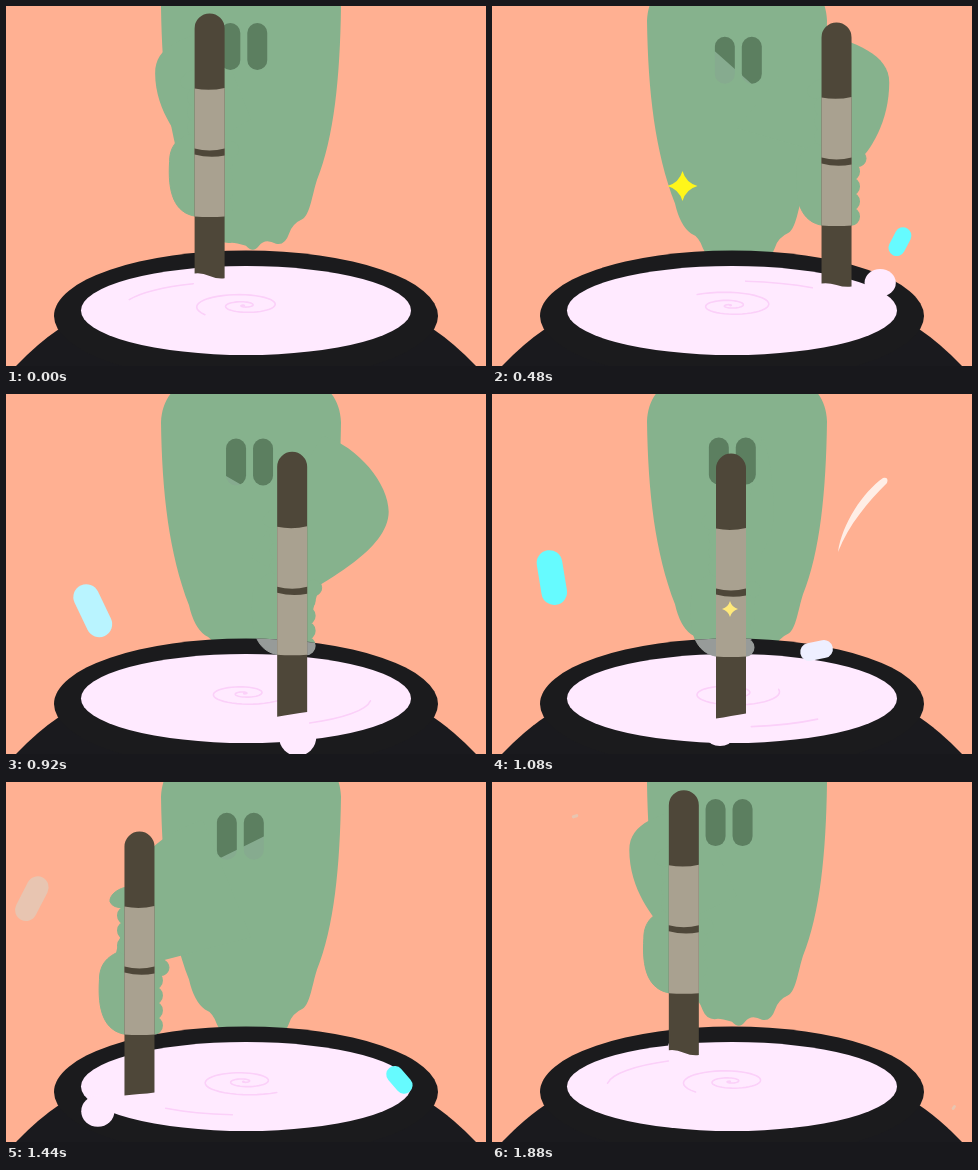
Recreate the animation shown at these times as an HTML page. Size 480 px wide and 360 px high, loop 1920 ms.

```html
<!DOCTYPE html>
<html lang="en">
<head>
<meta charset="utf-8">
<title>Stirring the cauldron</title>
<style>
  html, body { margin: 0; width: 100%; height: 100%; overflow: hidden; background: #ffb092; }
  svg { display: block; width: 100vw; height: 100vh; }
</style>
</head>
<body>
<svg viewBox="0 0 480 360">
  <defs>
    <path id="track" d="M239 6.5 A135 26.5 0 0 1 239 59.5 A135 26.5 0 0 1 239 6.5"/>
    <clipPath id="rimClip"><ellipse cx="240" cy="310" rx="192" ry="65.5"/></clipPath>
    <clipPath id="eyeClip"><path id="eyeCut"/></clipPath>
    <g id="eyes">
      <rect x="-23.5" y="-23.5" width="20" height="47" rx="10"/>
      <rect x="3.5" y="-23.5" width="20" height="47" rx="10"/>
    </g>
    <g id="hand">
      <path d="M0 118 H-15 C-26 122 -40 128 -40 148 C-42 178 -36 200 -13 203 H10 V118 Z"/>
      <path d="M-10 56 H-15 C-23 58 -30 64 -29.5 70 Q-27 77 -15 76 L0 77 Z"/>
      <circle cx="21.5" cy="136" r="8"/>
      <g fill="none" stroke-linecap="round" stroke-width="19" stroke-dasharray="0 15">
        <path d="M-13 84 V120"/><path d="M14 149 V196"/>
      </g>
    </g>
  </defs>

  <rect width="480" height="360" fill="#ffb092"/>
  <g fill="#86b28d" stroke="none">
    <path id="body" d="M155 14 C156 -10 170 -28 195 -28 H295 C320 -28 334 -10 335 14
      C334 85 328 145 311 187 C306 203 304 221 297 226 Q286 231 283 241 Q279 253 270 251
      Q259 245 253 253 Q247 261 240 253 Q230 250 226 250 Q215 252 211 242
      Q207 230 199 227 Q188 219 183 197 C163 145 156 85 155 14 Z"/>
    <path id="arm"/>
    <use href="#hand" class="held" stroke="#86b28d"/>
  </g>
  <g id="face">
    <use href="#eyes" fill="#86ab8f"/>
    <use href="#eyes" fill="#5c7f60" clip-path="url(#eyeClip)"/>
  </g>

  <path d="M10 360 Q32 337 53 323 H427 Q448 337 470 360 Z" fill="#1a1a1e"/>
  <ellipse cx="240" cy="310" rx="192" ry="65.5" fill="#1b1b1d"/>
  <g fill="#ffeaff">
    <ellipse cx="240" cy="304.5" rx="165" ry="44.5"/>
    <ellipse id="foam"/>
  </g>
  <g fill="none" stroke="#fbd0f9" stroke-width="1.6" stroke-linecap="round">
    <path id="spiral"/>
    <path id="streak" pathLength="1920" stroke-dasharray="240 1680"
      d="M240 275 A125 29 0 0 1 240 333 A125 29 0 0 1 240 275"/>
  </g>
  <g clip-path="url(#rimClip)"><use href="#hand" class="held" fill="#979b99" stroke="#979b99"/></g>

  <g class="held">
    <path id="wood" fill="#4e4739"/>
    <path d="M-15 75 Q0 78 15 74.5 V203 Q0 204 -15 203 Z" fill="#a9a190"/>
    <path d="M-15 135 Q0 139 15 135 V142 Q0 145 -15 141 Z" fill="#4e4739"/>
  </g>
  <path id="swoosh" fill="#ffeee6" d="M391 84 C371 98 350 130 346 158 C357 130 376 108 395 89 Q397 83 391 84 Z"/>
  <g id="drops"></g>
  <g id="stars"></g>
</svg>

<script>
const LOOP = 1920, STEP = 40, TAU = Math.PI * 2;
const $ = id => document.getElementById(id);
const set = (el, attrs) => { for (const k in attrs) el.setAttribute(k, attrs[k]); };
const add = (parent, tag, attrs = {}) => {
  const el = document.createElementNS("http://www.w3.org/2000/svg", tag);
  set(el, attrs);
  return parent.appendChild(el);
};
const clamp = (v, low, high) => Math.min(high, Math.max(low, v));
const mix = (a, b, u) => a + (b - a) * u;

// Each drop flies along a cubic curve while it spins
const drops = [
  { from: 240, to: 880, path: [[383, 290], [410, 240], [420, 190], [446, 176]],
    width: 17, length: 31, angle: 5, spin: 60, red: 130 },
  { from: 640, to: 1920, path: [[137, 284], [65, 170], [-50, 115], [96, 26]],
    width: 26, length: 56, angle: -54, spin: 130, red: 248 },
  { from: 1000, to: 1920, path: [[306, 258], [380, 240], [420, 370], [468, 320]],
    width: 18, length: 33, angle: 65, spin: 155, red: 248 }
];
const sparkles = [
  { x: 378, y: 247, r: 17.5, at: 280, fill: "#ffe4d4" },
  { x: 190.5, y: 180, r: 15, at: 480, fill: "#fff61a" },
  { x: 238, y: 215, r: 8, at: 1080, fill: "#ffe97a" }
];
for (const drop of drops) drop.el = add($("drops"), "rect");
for (const s of sparkles) s.el = add($("stars"), "path", {
  fill: s.fill, d: "M0 -1 Q.22 -.22 1 0 Q.22 .22 0 1 Q-.22 .22 -1 0 Q-.22 -.22 0 -1Z"
});

// Repeated interpolation reduces the control points to one point
function bezier(points, u) {
  while (points.length > 1)
    points = points.slice(1).map((p, i) => [mix(points[i][0], p[0], u), mix(points[i][1], p[1], u)]);
  return points[0];
}

function drawDrop({ el, from, to, path, width, length, angle, spin, red }, t) {
  const u = (t - from) / (to - from);
  set(el, { visibility: u >= 0 && u < 1 ? "visible" : "hidden" });
  if (u < 0 || u >= 1) return;
  const [x, y] = bezier(path, u);
  const size = 1 - u ** 4, w = width * size, h = length * size;
  const opacity = clamp(1 - (u - .5) * 6, .28, 1);
  const tint = Math.min(1, (u * 3) ** 2);
  const r = mix(red, 102, tint) + 100 * (1 - opacity);
  set(el, {
    x: -w / 2, y: -h / 2, width: w, height: h, rx: w / 2, opacity,
    fill: `rgb(${r},${mix(238, 251, tint)},255)`,
    transform: `translate(${x} ${y}) rotate(${angle + spin * u})`
  });
}

function spiralPath(turn) {
  const points = [];
  for (let i = 0; i <= 120; i++) {
    const u = i / 120, r = 51 * (1 - u) ** 2, a = turn + u * 2.75 * TAU;
    points.push(`${238 + r * Math.cos(a)} ${299.5 + r * .28 * Math.sin(a)}`);
  }
  return "M" + points.join("L");
}

// Shoulder to elbow to wrist; reach runs from -1 (left) to 1 (right)
function armPath(stick, reach) {
  const shoulder = { x: 260 + 65 * reach, y: 18 + stick.y * .4 };
  const elbow = { x: 260 + 141 * reach, y: stick.y + 60 };
  const wrist = { x: stick.x + 20 * reach, y: stick.y + 140 };
  return `M${shoulder.x} ${shoulder.y}
    C${mix(shoulder.x, elbow.x, .55)} ${shoulder.y + 12} ${elbow.x} ${elbow.y - 28} ${elbow.x} ${elbow.y}
    C${elbow.x} ${elbow.y + 38} ${wrist.x + 15 * reach} ${wrist.y - 10} ${wrist.x} ${wrist.y}
    L245 ${stick.y + 106} Z`;
}

const track = $("track"), trackLength = track.getTotalLength();
const held = document.querySelectorAll(".held");

function draw(t) {
  const phase = t / LOOP * TAU;
  const along = (t - 120 + LOOP) % LOOP / LOOP;
  const stick = track.getPointAtLength(along * trackLength);
  const depth = (stick.y - 33) / 26.5, side = (stick.x - 239) / 135;
  for (const el of held) set(el, { transform: `translate(${stick.x} ${stick.y})` });
  const end = 262.5 + 2.5 * depth, tip = end - 5 * depth;
  set($("wood"), { d: `M-15 15 A15 15 0 0 1 15 15 V${tip} Q8 ${tip + 1} 0 ${(end + tip) / 2} T-15 ${end} Z` });

  const bob = -13.8 * Math.cos(phase), sway = Math.sin(phase - TAU / 16);
  set($("body"), { transform: `translate(0 ${bob + .5})` });
  set($("face"), { transform: `translate(${240.3 + 6.5 * sway} ${54.3 + bob})` });
  set($("arm"), { d: armPath(stick, Math.tanh(2.4 * Math.sin(phase - TAU * 140 / LOOP))) });

  // The arm's upper edge tilts across the eyes
  const cut = 34 - 26 * sway ** 2, tilt = 24 * (.75 * sway + .2);
  set($("eyeCut"), { d: `M-24 -30 H24 V${cut + tilt} L-24 ${cut - tilt} Z` });

  const heave = Math.abs(side) * (1 + depth) * (1 + .7 * side);
  set($("foam"), {
    cx: 240 + 180 * side - 12 * depth, cy: 303 + 42 * depth,
    rx: 12 + 8 * heave, ry: 7 + 15 * heave
  });
  set($("spiral"), { d: spiralPath(TAU * 140 / 360 + phase) });
  set($("streak"), { "stroke-dashoffset": 430 - t });

  for (const drop of drops) drawDrop(drop, t);
  for (const s of sparkles) {
    const size = s.r * Math.max(0, 1 - ((t - s.at) / 120) ** 2);
    set(s.el, { transform: `translate(${s.x} ${s.y}) scale(${size})` });
  }
  set($("swoosh"), { opacity: Math.max(0, 1 - ((t - 1080) / 120) ** 4) });
}

const start = performance.now();
function tick() {
  const t = (performance.now() - start) % LOOP;
  draw(Math.floor(t / STEP) * STEP);
  requestAnimationFrame(tick);
}
tick();
</script>
</body>
</html>
```
